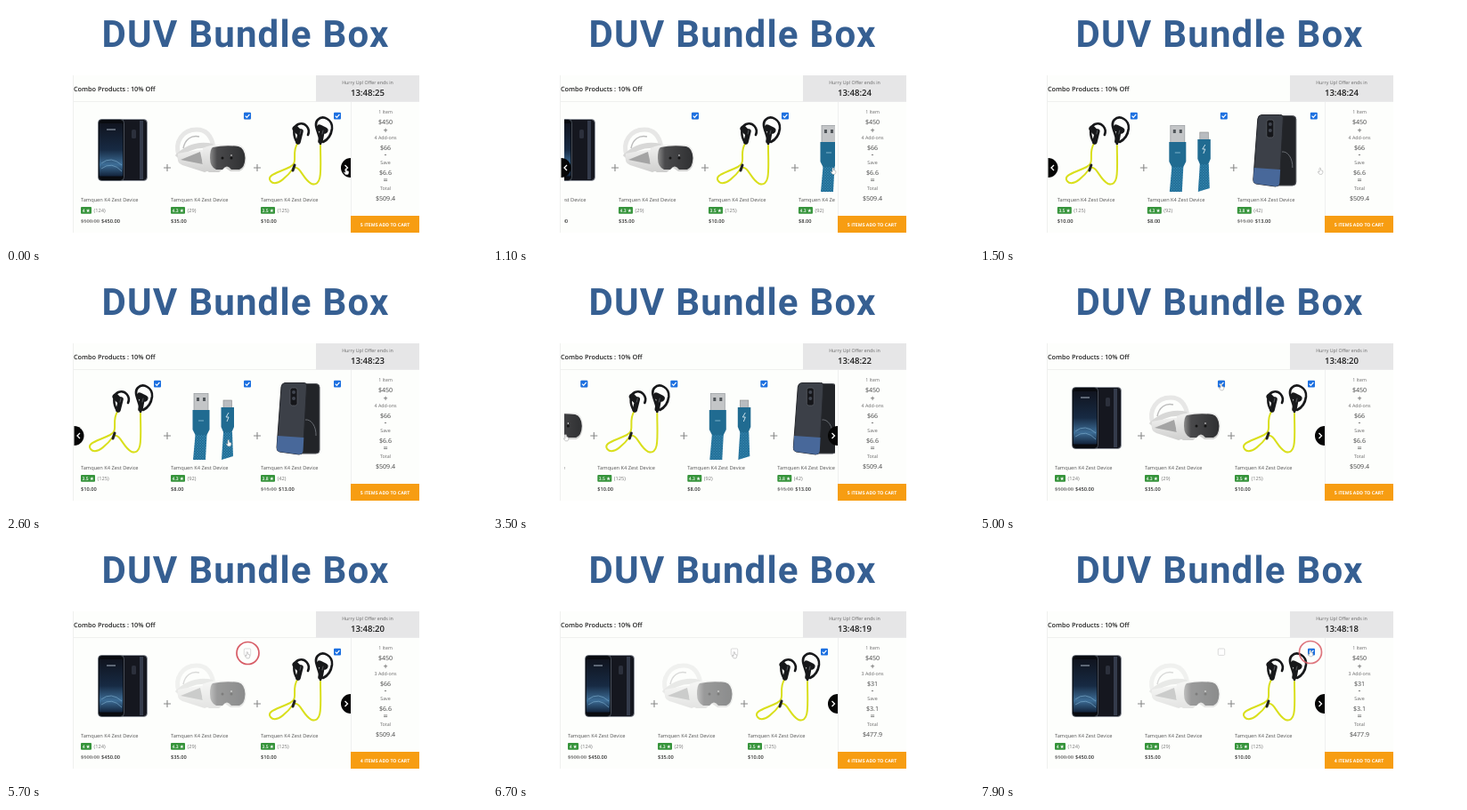
Animation, 540 px wide and 270 px high, one loop 8 s. Source, as an HTML page:

```html
<!DOCTYPE html>
<html lang="en">
<head>
<meta charset="utf-8">
<style>
  html, body { margin: 0; width: 100%; height: 100%; overflow: hidden; background: #fff; }
  svg { display: block; width: 540px; height: 270px; text-rendering: geometricPrecision; }
  text { font-family: "Open Sans", "Noto Sans", sans-serif; font-size: 5.7px; fill: #555; }
  .title { font: 700 42px Roboto, Inter, sans-serif; letter-spacing: 1.2px; fill: #365f92; }
  .mid { text-anchor: middle; }
  .head { font-size: 7.3px; font-weight: 600; fill: #222; }
  .clock { font-size: 9.6px; font-weight: 600; fill: #1c1c1c; }
  .small { font-size: 5.3px; fill: #666; }
  .sum { font-size: 7.1px; fill: #444; }
  .sign { font-size: 9px; fill: #444; }
  .button { font-size: 5.2px; font-weight: 700; fill: #fff; }
  .count { fill: #777; }
  .price { font-weight: 600; fill: #333; }
  .old { fill: #666; text-decoration: line-through; }
  .rate { font-size: 5px; font-weight: 600; fill: #fff; }
</style>
</head>
<body>
<svg viewBox="0 0 540 270">
  <defs>
    <clipPath id="window"><rect x="80" y="109" width="304" height="145"/></clipPath>
    <linearGradient id="screen" x2="0" y2="1">
      <stop offset="0" stop-color="#10141f"/><stop offset=".5" stop-color="#172a43"/>
      <stop offset=".78" stop-color="#3d6d96"/><stop offset="1" stop-color="#12233b"/>
    </linearGradient>
    <linearGradient id="visor"><stop offset="0" stop-color="#8b8b8b"/><stop offset=".2" stop-color="#4a4a4c"/><stop offset="1" stop-color="#2f3032"/></linearGradient>
    <linearGradient id="shell" x2="0" y2="1"><stop offset="0" stop-color="#f1f1f0"/><stop offset="1" stop-color="#cfcfce"/></linearGradient>
    <pattern id="braid" width="3" height="3" patternUnits="userSpaceOnUse">
      <rect width="3" height="3" fill="#1e6a94"/><path d="M0 0L3 3M3 0L0 3" stroke="#3d8db2" stroke-width=".6"/>
    </pattern>

    <g id="phone">
      <rect x="44" y="127.500" width="30.500" height="69" rx="4" fill="#15171f" stroke="#9298a3" stroke-width=".8"/>
      <rect x="57" y="139" width="5" height="10" rx="1.500" fill="#2c303c"/>
      <path d="M68 129V195" stroke="#343b4b" stroke-width="4"/>
      <rect x="19.500" y="127.500" width="29" height="69" rx="4" fill="#090b10" stroke="#626a76" stroke-width=".7"/>
      <rect x="20.800" y="132" width="26.400" height="59.500" rx="1" fill="url(#screen)"/>
      <path d="M23 177Q34 168 46 179M23 183Q35 174 46 186" fill="none" stroke="#78a6c8" stroke-width=".7"/>
      <path d="M29 139h10" stroke="#aab6c4" stroke-width="1"/>
    </g>

    <g id="headset">
      <path d="M9 168C4 153 13 139 29 139C41 139 46 147 48 159" fill="none" stroke="#e7e7e6" stroke-width="5"/>
      <path d="M7 170C20 157 34 155 47 158" fill="none" stroke="#d8d8d7" stroke-width="6"/>
      <path d="M14 160C16 150 23 145 32 147" fill="none" stroke="#bcbcbc" stroke-width="1.500"/>
      <path d="M8 166Q6 177 13 179L38 187L48 183V160L24 163Z" fill="url(#shell)"/>
      <path d="M11 173L33 164L36 178Z" fill="#a4a4a4"/>
      <path d="M36 160Q43 156 57 156H75Q84 157 84.500 170Q85 183 77 186H67L61 182L54 187H43Q35 183 35 172Z" fill="url(#shell)"/>
      <path d="M47 159Q61 156 76 158Q83 160 83.500 171Q83 182 77 184H68Q63 177 58 184H51Q44 181 44 171Q44 161 47 159Z" fill="url(#visor)"/>
      <circle cx="58" cy="171" r="1.500" fill="#151515"/><circle cx="68" cy="171" r="1.500" fill="#151515"/>
      <path d="M68 167v2" stroke="#d8d8d8" stroke-width="1"/>
    </g>

    <g id="earphones" fill="none" stroke-linecap="round">
      <path d="M41 155C34 166 43 176 33 181C19 188 6 190 11 197C18 205 32 189 37 182C45 180 47 195 57 200C70 204 67 182 67 157" stroke="#d9df1c" stroke-width="2"/>
      <path d="M38 179L36 185" stroke="#222" stroke-width="3"/>
      <g stroke="#17181a">
        <path d="M41 154C36 146 36 136 42 133C50 130 56 138 53 145" stroke-width="2.600"/>
        <path d="M42 153L45 141" stroke-width="5.500"/>
        <path d="M39 138L43 142" stroke-width="7"/>
        <path d="M67 155C67 144 58 134 64 128C70 122 81 128 80 138C79 146 74 151 70 153" stroke-width="2.600"/>
        <path d="M67 152L69 141" stroke-width="5.500"/>
        <path d="M66 137L72 140" stroke-width="7"/>
      </g>
      <path d="M44 144l1-4M69 144l1-4" stroke="#55585c" stroke-width="1"/>
    </g>

    <g id="cable">
      <rect x="26" y="134.500" width="16" height="20" fill="#c3c5c7" stroke="#92979b" stroke-width=".7"/>
      <path d="M29 139h3v4h-3zM36 139h3v4h-3z" fill="#51565a"/>
      <path d="M24.500 153H43.500V175L40 182H28L24.500 175Z" fill="#206b91"/>
      <path d="M27.500 181H40.500L39 209H25Z" fill="url(#braid)"/>
      <path d="M31 165h6" stroke="#7db2ca" stroke-width="1"/>
      <rect x="59" y="142" width="9.500" height="9" fill="#b9bcc0" stroke="#888" stroke-width=".6"/>
      <path d="M56.500 150H71V172L68 179H59.500L56.500 172Z" fill="#206b91"/>
      <path d="M59 178H69L70 205L57 209Z" fill="url(#braid)"/>
      <path d="M65 156l-3 5h3l-2 5" fill="none" stroke="#dcebf2" stroke-width=".9"/>
    </g>

    <g id="case">
      <rect x="40" y="123.500" width="26" height="78.500" rx="4" fill="#222428" stroke="#54575d"/>
      <path d="M50 164a11 17 0 0 1 12 18" fill="none" stroke="#696d73"/>
      <path d="M27 122.500H48Q52 122 51.500 127L47.500 199Q47 203 43 203L21 200Q17.500 199 18 195L23 127Q23.500 123 27 122.500Z" fill="#3c4048" stroke="#25272c"/>
      <path d="M18.800 182L48.300 184L47.500 199Q47 203 43 203L21 200Q17.500 199 18 195Z" fill="#48689a"/>
      <rect x="33" y="128" width="8" height="20" rx="2.500" fill="#15161a" stroke="#5c6068" stroke-width=".7"/>
      <circle cx="37" cy="133" r="2" fill="#40454f"/><circle cx="37" cy="140" r="2" fill="#40454f"/>
    </g>
  </defs>

  <text class="title mid" x="269" y="45.500">DUV Bundle Box</text>
  <path d="M75 78H464V255H75Z" fill="#fdfefc"/>
  <path d="M75 107.500H464M387.500 108V236M75.500 78V255" stroke="#eff0ef" fill="none"/>
  <path d="M348 78H464V107.500H348Z" fill="#e6e6e7"/>
  <text class="head" x="76" y="95.500">Combo Products : 10% Off</text>
  <text class="small mid" x="406" y="87.500">Hurry Up! Offer ends in</text>
  <text class="clock mid" id="clock" x="406" y="101"></text>

  <g clip-path="url(#window)"><g id="strip"></g></g>
  <g id="next"><path d="M387 171A11 11 0 0 0 387 193Z" fill="#050505"/><path d="M380.500 179l3 3l-3 3" fill="none" stroke="#fff" stroke-width="1.300"/></g>
  <g id="prev"><path d="M76.500 171A11 11 0 0 1 76.500 193Z" fill="#050505"/><path d="M83 179l-3 3l3 3" fill="none" stroke="#fff" stroke-width="1.300"/></g>

  <g id="totals"></g>
  <path d="M387 236H464V255H387Z" fill="#f79d12"/>
  <text class="button mid" id="button" x="425.500" y="247.500"></text>

  <path id="cursor" d="M-1 -3q1 -1 1.500 0v2.200l2.300 .8v2l-1 1.800h-2.600l-2 -2.600q0 -1 1.800 .2z" fill="#fff" stroke="#999" stroke-width=".5"/>
  <circle id="ring" r="12.500" fill="none" stroke="#d75b65" stroke-width="1.700"/>
</svg>
<script>
const LOOP = 8000, PITCH = 101;
const $ = id => document.getElementById(id);

const products = [
  { art: "phone", rate: "4", count: 124, old: "$500.00", price: "$450.00" },
  { art: "headset", rate: "4.3", count: 29, price: "$35.00" },
  { art: "earphones", rate: "3.5", count: 125, price: "$10.00" },
  { art: "cable", rate: "4.3", count: 92, price: "$8.00" },
  { art: "case", rate: "3.8", count: 42, old: "$15.00", price: "$13.00" }
];

function productMarkup(p, i) {
  const badge = p.rate.length > 1 ? 16 : 12;
  const priceX = p.old ? (p.old.length > 6 ? 23 : 20) : 0;
  const check = i ? `<g id="check${i}"><rect x="82" y="119.700" width="8" height="7.800" rx="1" fill="#1b6fe0"/>
    <path d="M83.700 123.700l1.700 1.700l3 -3.600" fill="none" stroke="#fff" stroke-width="1.200"/></g>` : "";
  const plus = i < products.length - 1 ? `<path d="M93 182h8M97 178v8" stroke="#888" stroke-width="1.100"/>` : "";
  return `<g transform="translate(${84 + i * PITCH})">
    <use id="art${i}" href="#${p.art}"/>${plus}
    ${i === 1 ? '<rect x="82.300" y="120" width="7.400" height="7.400" rx="1" fill="#fff" stroke="#ccc" stroke-width=".7"/>' : ""}${check}
    <text y="219.500">Tamquen K4 Zest Device</text>
    <rect y="226" width="${badge}" height="7.800" rx="1" fill="#36943b"/>
    <text class="rate mid" x="${badge / 2}" y="231.800">${p.rate} ★</text>
    <text class="count" x="${badge + 2.5}" y="232">(${p.count})</text>
    ${p.old ? `<text class="old" y="244">${p.old}</text>` : ""}
    <text class="price" x="${priceX}" y="244">${p.price}</text></g>`;
}
$("strip").innerHTML = products.map(productMarkup).join("");

// Side panel rows: class, baseline, id, fixed text
const rows = [
  ["small", 121, "", "1 Item"], ["sum", 133, "", "$450"], ["sign", 142.5, "", "+"],
  ["small", 150, "addons"], ["sum", 162, "extra"], ["sign", 170, "", "-"],
  ["small", 178, "", "Save"], ["sum", 190, "saved"], ["sign", 199, "", "="],
  ["small", 207, "", "Total"], ["sum", 218.5, "total"]
];
$("totals").innerHTML = rows.map(([style, y, id, label = ""]) =>
  `<text class="${style} mid" x="426" y="${y}" ${id && `id="${id}"`}>${label}</text>`).join("");

const progress = (t, from, to) => Math.min(1, Math.max(0, (t - from) / (to - from)));
const swing = p => 0.5 - Math.cos(p * Math.PI) / 2;
const show = (id, visible) => $(id).setAttribute("visibility", visible ? "visible" : "hidden");
const move = (id, x, y) => $(id).setAttribute("transform", `translate(${x} ${y})`);

const cursorMoves = [
  [100, 200, 382, 185.5], [1900, 2300, 250, 190], [2600, 3000, 82, 184],
  [4200, 5000, 271, 127], [6700, 7500, 371, 125]
];
function cursorAt(t) {
  let x = 382, y = 186;
  for (const [from, to, toX, toY] of cursorMoves) {
    const p = swing(progress(t, from, to));
    x += (toX - x) * p;
    y += (toY - y) * p;
  }
  return [x, y];
}

function render(t) {
  const forward = swing(progress(t, 900, 1550)), back = swing(progress(t, 3328, 3978));
  move("strip", -2 * PITCH * (forward - back), 0);
  const atEnd = t >= 950 && t < 3350;
  show("prev", atEnd);
  show("next", !atEnd);

  $("clock").textContent = "13:48:" + (25 - Math.floor(t / 1000));
  const unchecked = t >= 5450, repriced = t >= 6050;
  show("check1", !unchecked);
  $("art1").setAttribute("opacity", unchecked ? 0.55 : 1);
  $("addons").textContent = (unchecked ? 3 : 4) + " Add-ons";
  $("button").textContent = (unchecked ? 4 : 5) + " ITEMS ADD TO CART";
  $("extra").textContent = repriced ? "$31" : "$66";
  $("saved").textContent = repriced ? "$3.1" : "$6.6";
  $("total").textContent = repriced ? "$477.9" : "$509.4";

  move("cursor", ...cursorAt(t));
  const second = t > 6500;
  move("ring", second ? 371 : 271.5, second ? 124 : 125);
  $("ring").setAttribute("opacity", second
    ? progress(t, 7650, 7950)
    : progress(t, 5100, 5400) * (1 - progress(t, 5780, 5980)));
}

const start = performance.now();
function frame() {
  render((performance.now() - start) % LOOP);
  requestAnimationFrame(frame);
}
frame();
</script>
</body>
</html>
```
